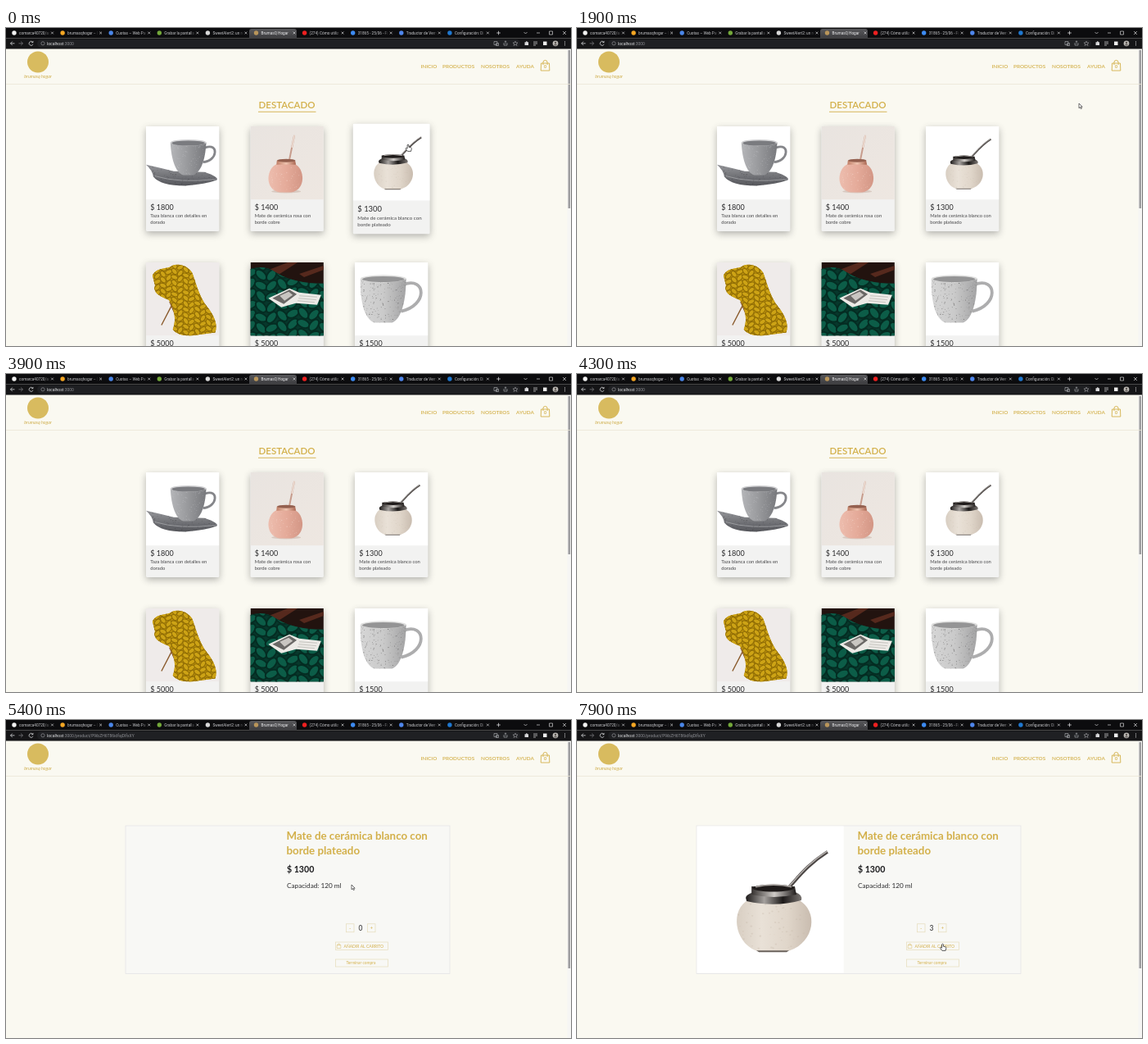
Write an HTML page with a canvas that moves like this. It is 690 px wide and 388 px high and loops after 8000 ms.

```html
<!DOCTYPE html>
<html lang="es">
<head>
<meta charset="utf-8">
<title>BrumasQ Hogar</title>
<style>
html, body { margin: 0; width: 100%; height: 100%; overflow: hidden; background: #faf9f1; }
canvas { display: block; width: 690px; height: 388px; }
</style>
</head>
<body>
<canvas id="stage"></canvas>
<script>
const W = 690, H = 388, LOOP = 8000, STEP = 100;
const canvas = document.getElementById('stage');
const ratio = window.devicePixelRatio || 1;
canvas.width = W * ratio;
canvas.height = H * ratio;
const c = canvas.getContext('2d');

const GOLD = '#d3b04a', PAPER = '#faf9f1', INK = '#2b2b2d';
const LATO = 'Lato, "Open Sans", sans-serif', UI = 'Roboto, "Open Sans", sans-serif';

// Moments at which the page changes
const LEAVE = 1100, ENTER = 4700, OPEN = 5200, PHOTO = 5600, CLICKS = [7000, 7200, 7400];

// Pointer stops: time, x, y
const PATHS = [
  [[0, 491, 142], [1000, 491, 142], [1500, 613, 92], [2300, 613, 92], [2700, 616, 42], [2900, 640, 6]],
  [[4400, 640, 40], [4900, 478, 194], [5200, 478, 194], [5400, 422, 201], [5800, 422, 201],
   [6300, 449, 252.5], [7450, 449, 252.5], [7750, 446.5, 273]]
];

const clamp = v => Math.max(0, Math.min(1, v));
const ease = v => { v = clamp(v); return v * v * (3 - 2 * v); };

function rng(seed) {
  return () => (seed = (seed * 16807) % 2147483647) / 2147483647;
}

function text(s, x, y, size, color, weight = 400, align = 'left', family = LATO) {
  c.font = `${weight} ${size}px ${family}`;
  c.fillStyle = color;
  c.textAlign = align;
  c.fillText(s, x, y);
}

function rect(x, y, w, h, color) {
  c.fillStyle = color;
  c.fillRect(x, y, w, h);
}

function round(x, y, w, h, r, color) {
  c.beginPath();
  c.roundRect(x, y, w, h, r);
  c.fillStyle = color;
  c.fill();
}

function oval(x, y, rx, ry, color) {
  c.beginPath();
  c.ellipse(x, y, rx, ry, 0, 0, 7);
  c.fillStyle = color;
  c.fill();
}

function shape(d, fill, stroke, width = 1) {
  const p = new Path2D(d);
  if (fill) { c.fillStyle = fill; c.fill(p); }
  if (stroke) { c.strokeStyle = stroke; c.lineWidth = width; c.stroke(p); }
  return p;
}

function ramp(x0, y0, x1, y1, ...colors) {
  const g = c.createLinearGradient(x0, y0, x1, y1);
  colors.forEach((k, i) => g.addColorStop(i / (colors.length - 1), k));
  return g;
}

// Speckled glaze inside a path
function grain(path, count, color, seed) {
  const rnd = rng(seed);
  c.save();
  c.clip(path);
  for (let i = 0; i < count; i++) {
    const r = .25 + rnd() * .45;
    oval(rnd() * 90, rnd() * 90, r, r * .8, color);
  }
  c.restore();
}

// Plaited stitches inside a path
function knit(path, size, dark, light) {
  c.save();
  c.clip(path);
  for (let row = 0; row * size < 100; row++) {
    for (let col = 0; col * size < 100; col++) {
      const tilt = (col % 2 ? .7 : -.7) + Math.sin(row * 2 + col) * .3;
      c.beginPath();
      c.ellipse(col * size, row * size + Math.sin(col) * 3, size * .62, size * .38, tilt, 0, 7);
      c.fillStyle = light;
      c.fill();
      c.strokeStyle = dark;
      c.lineWidth = size * .15;
      c.stroke();
    }
  }
  c.restore();
}

// Product pictures, each on an area of 90 by 90
function saucerCup() {
  rect(0, 0, 90, 90, '#fff');
  const leaf = shape('M0 47Q18 51 34 55L72 56Q90 62 87 66Q74 71 48 73Q18 73 9 62Q8 54 0 47Z',
    ramp(0, 50, 0, 73, '#8d8e92', '#55565b'));
  grain(leaf, 500, 'rgba(50,50,54,.5)', 5);
  shape('M11 61Q40 70 86 65', null, '#a6a7aa', .8);
  shape('M73 26C90 20 88 43 70 44', null, '#85868a', 2.8);
  const cup = shape('M30 20C31 42 37 58 46 60L58 60C67 57 73 42 74 20Z',
    ramp(30, 0, 74, 0, '#b4b5b8', '#97989b', '#77787c'));
  grain(cup, 500, 'rgba(225,225,228,.4)', 8);
  oval(52, 20, 22, 4, '#cfcfd1');
  oval(52, 20.6, 20.3, 3.1, '#7a7b7f');
}

function pinkMate() {
  rect(0, 0, 90, 90, ramp(0, 0, 90, 90, '#e9e4e0', '#eee7e1'));
  oval(44, 80, 18, 2, '#d8c9c0');
  shape('M47.5 43L54 11', null, '#c79c8c', 2);
  shape('M51 26L54 11', null, '#efe0d6', 1.5);
  const pot = shape('M33 46C19 51 17 78 36 81L50 81C69 78 67 51 54 46Z',
    ramp(22, 0, 65, 0, '#edbdae', '#e5ab9a', '#d29584'));
  grain(pot, 350, 'rgba(250,226,216,.5)', 13);
  shape('M32.5 42L55 42L56 47L32 47Z', ramp(32, 0, 56, 0, '#c07e66', '#efc4b0', '#a96550'));
  oval(44, 42, 11.3, 2, '#94604f');
}

function whiteMate() {
  rect(0, 0, 90, 90, '#fff');
  shape('M55 39C61 33 67 24 80 15.8', null, '#4b4644', 2);
  shape('M55 38.5C61 32.5 67 23.5 80 15.3', null, '#b5b1ae', .7);
  shape('M36 75.8H57L55 77.2H38Z', '#6a625c');
  const pot = shape('M32 45C20 51 23 71 36 76.2L57 76.2C72 71 75 52 62 45Z',
    ramp(24, 0, 71, 0, '#d8cec2', '#e9e1d7', '#e0d6ca', '#c8bbae'));
  grain(pot, 300, 'rgba(198,184,168,.35)', 17);
  shape('M30 44Q30 42 35 40.5L60 40.5Q65 42 64 45.5Q48 50 30.5 46Z',
    ramp(30, 0, 64, 0, '#1d1a19', '#a5a19e', '#1d1a19', '#77726f'));
  shape('M33.5 37L60 37L61 42Q47 45 33.5 42Z', ramp(34, 0, 61, 0, '#3a3634', '#cfcbc7', '#1f1b1a'));
  oval(46.8, 38, 12.8, 2.2, '#1f1b1a');
  shape('M36 37.3Q47 34.8 58 37.3', null, '#a8a39f', .9);
}

function yellowThrow() {
  rect(0, 0, 90, 90, '#efebea');
  shape('M32 52L19 77M29 48L40 74M65 60L70 84', null, '#8a5a2c', 1.4);
  const p = shape('M8 16C13 5 27 9 32 4C42 0 55 6 58 16C62 28 66 42 74 53C82 63 89 74 85 86L62 89C50 92 36 88 33 82C37 72 36 58 28 46C18 42 8 38 11 28Z', '#bd920c');
  knit(p, 7, '#8f6c05', '#cda315');
}

function greenThrow() {
  rect(0, 0, 90, 90, '#22130f');
  shape('M20 10L46 0H58L36 14ZM60 14L90 4V9L66 18Z', '#56291d');
  const p = shape('M0 8Q18 2 34 14Q56 26 90 26L90 90L0 90Z', '#07382c');
  knit(p, 13, '#042c22', '#0c5d48');
  shape('M22 44L48 32L60 37L87 40L82 52L56 50L38 55Z', '#eceae6');
  shape('M27 44L48 33.5L57 39L41 51Z', '#6a6866');
  shape('M36 41L47 36L52 40L42 47Z', '#c9c6c2');
  shape('M60 41L82 42.5M59 44L81 46M58 47L79 49', null, '#b6b3ae', .7);
}

function speckledMug() {
  rect(0, 0, 90, 90, '#fff');
  shape('M60 27C88 17 90 53 57 60', null, '#adadae', 3.8);
  const mug = shape('M7 20C6 45 11 70 24 74L46 74C58 69 63 45 63 20Z',
    ramp(7, 0, 63, 0, '#d6d6d6', '#cacaca', '#a3a3a4'));
  grain(mug, 650, 'rgba(82,80,80,.65)', 29);
  oval(35, 20, 28, 4.6, '#dededd');
  oval(35, 20.6, 26, 3.5, '#949495');
}

function picture(draw, x, y, size) {
  c.save();
  c.beginPath();
  c.rect(x, y, size, size);
  c.clip();
  c.translate(x, y);
  c.scale(size / 90, size / 90);
  draw();
  c.restore();
}

const CARDS = [
  [saucerCup, '1800', 'Taza blanca con detalles en', 'dorado'],
  [pinkMate, '1400', 'Mate de cerámica rosa con', 'borde cobre'],
  [whiteMate, '1300', 'Mate de cerámica blanco con', 'borde plateado'],
  [yellowThrow, '5000', 'Manta de lana gruesa', 'mostaza'],
  [greenThrow, '5000', 'Manta de lana gruesa', 'verde'],
  [speckledMug, '1500', 'Taza de cerámica', 'moteada']
];

function card([draw, price, line1, line2], x, y, grow) {
  const w = 89.4, h = 128;
  c.save();
  c.translate(x + w / 2, y + h / 2);
  c.scale(1 + .05 * grow, 1 + .05 * grow);
  c.translate(-w / 2, -h / 2);
  c.save();
  c.shadowColor = 'rgba(60,60,60,.38)';
  c.shadowBlur = 8 * ratio;
  c.shadowOffsetY = 3 * ratio;
  round(0, 0, w, h, 1.5, '#f2f2f1');
  c.restore();
  picture(draw, 0, 0, w);
  text('$ ' + price, 5.2, 102.3, 9, INK);
  text(line1, 5.2, 111.2, 5.85, '#48484a');
  text(line2, 5.2, 118.8, 5.85, '#48484a');
  c.restore();
}

const TABS = [
  ['comarca40720/ast', '#f1f1f1'], ['brumasqhogar – D', '#f5a623'], ['Cuotas – Web Pan', '#4a86e8'],
  ['Grabar la pantalla', '#74a93a'], ['SweetAlert2: un re', '#d8d8d8'], ['BrumasQ Hogar', '#b9955a'],
  ['(274) Cómo utiliz', '#f02020'], ['31865 - 25/06 - Fi', '#3d8bf2'], ['Traductor de Vem', '#4f86ec'],
  ['Configuración: Di', '#1f78d1']
];

function cross(x, y, r, color) {
  shape(`M${x - r} ${y - r}L${x + r} ${y + r}M${x + r} ${y - r}L${x - r} ${y + r}`, null, color, .7);
}

function browser(path) {
  rect(0, 0, W, 12.5, '#0c0c0e');
  rect(0, 12.5, W, 13, '#151517');
  TABS.forEach(([name, color], i) => {
    const x = 4.5 + i * 59.1, on = i === 5;
    const back = on ? '#4c4c4f' : '#0c0c0e', ink = on ? '#f0f0f2' : '#c6c7ca';
    if (on) round(x - 3, 1, 58, 11.5, [3, 3, 0, 0], ramp(0, 1, 0, 12.5, '#58585b', '#3c3c3f'));
    oval(x + 5.5, 6, 2.7, 2.7, color);
    c.save();
    c.beginPath();
    c.rect(x + 10, 0, 39, 12);
    c.clip();
    text(name, x + 11.5, 7.7, 4.7, ramp(x + 43, 0, x + 49, 0, ink, back), 400, 'left', UI);
    c.restore();
    cross(x + 52, 6, 1.4, '#d4d4d6');
  });
  shape('M601.5 3.7V8.3M599.2 6H603.8', null, '#d4d4d6', .8);
  shape('M632.5 5L634.5 7L636.5 5M648 6H652M663.5 4H667.5V8H663.5Z', null, '#d0d0d2', .7);
  cross(682, 6, 2, '#d0d0d2');

  shape('M10.5 18.8H5.5M7.8 16.5L5.5 18.8L7.8 21.1', null, '#d5d6d8', .8);
  shape('M15.5 18.8H20.5M18.2 16.5L20.5 18.8L18.2 21.1', null, '#77787c', .8);
  shape('M32.6 17.2A2.5 2.5 0 1 0 33 19.8M33 15.9V17.7H31.2', null, '#d5d6d8', .8);
  round(38, 14, 590, 9.8, 4.9, '#1f2023');
  c.beginPath();
  c.arc(45, 18.8, 2.1, 0, 7);
  c.strokeStyle = '#a4a5a9';
  c.lineWidth = .6;
  c.stroke();
  text('localhost', 50, 20.6, 5, '#e4e5e7', 400, 'left', UI);
  const start = 50 + c.measureText('localhost').width;
  text(':3000' + path, start, 20.6, 5, '#8e8f94', 400, 'left', UI);
  shape('M596 16.5H600V20.5H596ZM598.5 18.5H601.5V21.5H598.5Z', null, '#b8b9bc', .6);
  shape('M608 18V21H612V18M610 19.5V15.8M608.8 17L610 15.8L611.2 17', null, '#b8b9bc', .6);
  shape('M622 16L622.8 18H625L623.3 19.3L624 21.4L622 20.2L620 21.4L620.7 19.3L619 18H621.2Z', null, '#b8b9bc', .5);
  shape('M633.5 17.2H635V16.2H636.5V17.2H638V21H633.5Z', '#d8d8da');
  shape('M644 17H649M644 19H649M644 21H647', null, '#d8d8da', .7);
  rect(656, 16.5, 4.5, 4.5, '#eeeeee');
  oval(671, 18.8, 3.4, 3.4, '#b9b6b2');
  oval(671, 18, 1.2, 1.3, '#55504d');
  shape('M668.8 21.2Q671 18.3 673.2 21.2Z', '#55504d');
  for (let i = -1; i < 2; i++) oval(682.5, 18.8 + i * 2, .6, .6, '#d8d8da');
}

function bag(x, y, s) {
  c.save();
  c.translate(x, y);
  c.scale(s, s);
  shape('M-5 -3H5L5.3 6H-5.3ZM-2.6 -1V-4A2.6 2.6 0 0 1 2.6 -4V-1', null, GOLD, .9);
  c.restore();
}

function header() {
  rect(0, 68, W, .8, '#ece7d6');
  oval(39, 41.5, 13, 13, '#d8bb5f');
  text('brumasq hogar', 39, 61, 5.4, '#cfae4c', 'italic 400', 'center');
  [['INICIO', 506.5], ['PRODUCTOS', 533], ['NOSOTROS', 580], ['AYUDA', 623]]
    .forEach(([s, x]) => text(s, x, 49.2, 6.4, GOLD, 600));
  bag(658.5, 46, 1);
  text('0', 658.5, 49, 5.2, GOLD, 700, 'center');
}

function scrollbar(end) {
  rect(685.5, 25.5, 4.5, H, '#f6f6f4');
  rect(686.5, 27, 2.6, end - 27, '#9d9d9f');
}

function shop(grow) {
  text('DESTACADO', 343, 98.3, 11.5, GOLD, 600, 'center');
  rect(308, 101.8, 70.5, .9, GOLD);
  CARDS.forEach((item, i) => {
    if (i !== 2) card(item, 171 + (i % 3) * 127.5, i < 3 ? 120 : 286, 0);
  });
  card(CARDS[2], 426, 120, grow);
  scrollbar(220);
}

function frame(x, y, w, h, color) {
  c.strokeStyle = color;
  c.lineWidth = .7;
  c.strokeRect(x, y, w, h);
}

function product(t) {
  rect(146, 129, 396, 180.5, '#f8f8f5');
  frame(146, 129, 396, 180.5, '#e2e2e4');
  if (t >= PHOTO) picture(whiteMate, 146.3, 129.3, 179.5);
  text('Mate de cerámica blanco con', 342.5, 146.3, 13.35, GOLD, 700);
  text('borde plateado', 342.5, 164, 13.35, GOLD, 700);
  text('$ 1300', 343, 185.8, 10.6, '#1c1c1e', 700);
  text('Capacidad: 120 ml', 343, 204.6, 8.2, INK);

  const count = CLICKS.filter(k => t >= k).length;
  frame(415.5, 248.8, 9.5, 10, '#e6dcba');
  frame(441.5, 248.8, 9.5, 10, '#e6dcba');
  text('-', 420.3, 256, 6.5, GOLD, 400, 'center');
  text('+', 446.3, 256, 6.5, GOLD, 400, 'center');
  text(count, 433, 257, 8.5, INK, 400, 'center');
  frame(402.5, 271, 64, 9.5, '#e6dcba');
  bag(406.5, 275.8, .45);
  text('AÑADIR AL CARRITO', 412.5, 277.6, 5, GOLD);
  frame(402.5, 292, 64, 9, '#e6dcba');
  text('Terminar compra', 433.5, 298.2, 4.9, GOLD, 400, 'center');
  scrollbar(303);
}

function pointer(t) {
  const path = PATHS.find(p => t >= p[0][0] && (p !== PATHS[0] || t < p[p.length - 1][0]));
  if (!path) return;
  let i = 0;
  while (i < path.length - 1 && t >= path[i + 1][0]) i++;
  const a = path[i], b = path[i + 1] || a;
  const k = a === b ? 0 : ease((t - a[0]) / (b[0] - a[0]));
  c.save();
  c.translate(a[1] + (b[1] - a[1]) * k, a[2] + (b[2] - a[2]) * k);
  c.lineJoin = 'round';
  const hand = t < LEAVE || (t >= ENTER && t < OPEN) || t >= 6200;
  if (hand) {
    shape('M-.9 .8Q0 -.5 .9 .8V3.2L3.6 3.9Q4.5 4.3 4.3 5.4L3.6 8.4H-.6L-2.9 5.4Q-2.8 4 -1.7 4.6L-.9 5.2Z', '#fff', '#333', .8);
  } else {
    shape('M0 0V5.8L1.4 4.6L2.4 6.7L3.4 6.2L2.4 4.2H4.2Z', '#fff', '#333', .7);
  }
  c.restore();
}

function draw(now) {
  const t = Math.floor((now % LOOP) / STEP) * STEP;
  c.setTransform(ratio, 0, 0, ratio, 0, 0);
  rect(0, 0, W, H, PAPER);
  const open = t >= OPEN;
  if (open) product(t);
  else shop(t < 3000 ? 1 - ease((t - LEAVE) / 200) : ease((t - ENTER) / 200));
  header();
  browser(open ? '/product/P9ibZH6T86idfajDlfxXY' : '');
  pointer(t);
}

let begin;
function tick(now) {
  if (begin === undefined) begin = now;
  draw(now - begin);
  requestAnimationFrame(tick);
}
requestAnimationFrame(tick);
</script>
</body>
</html>
```
